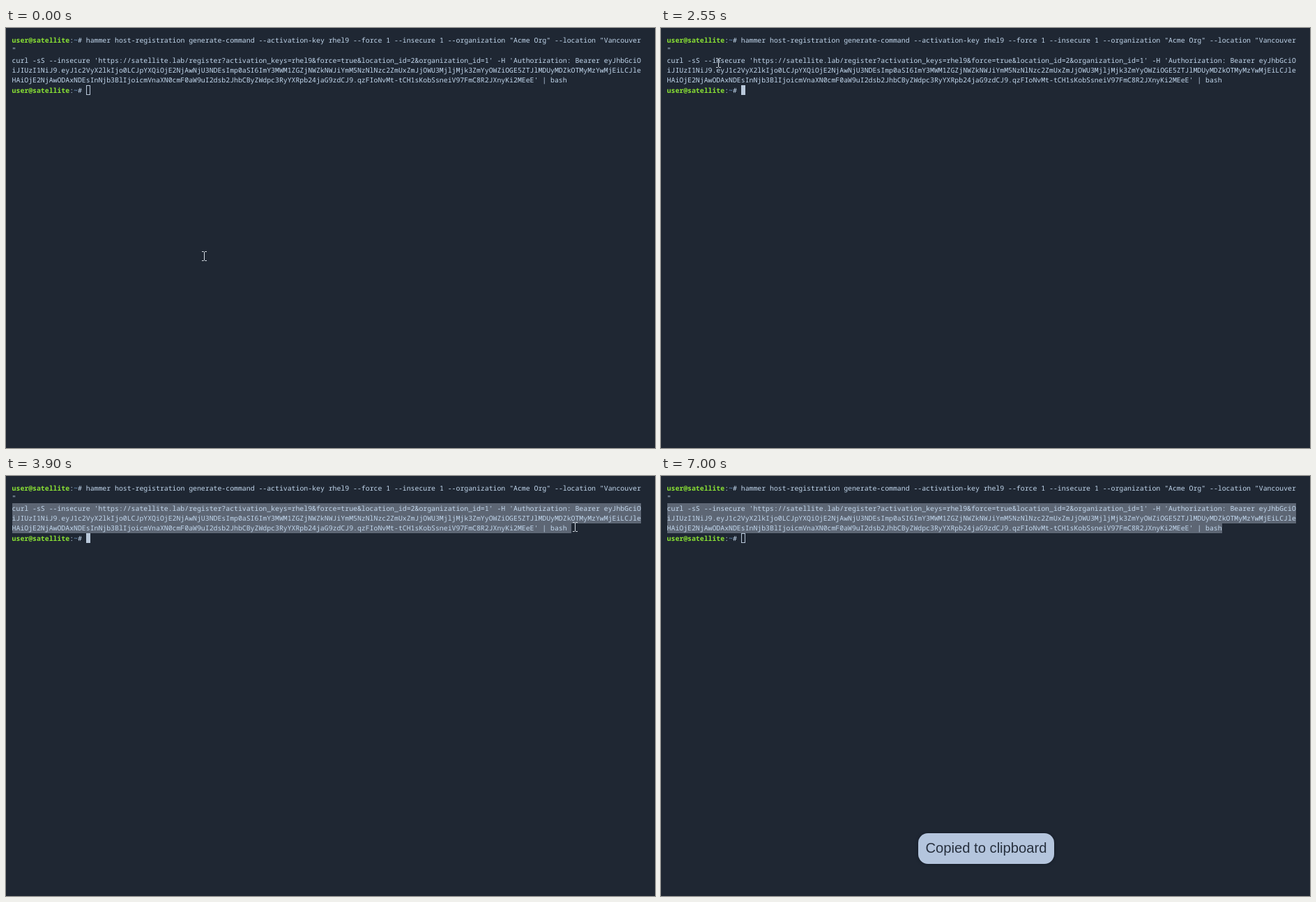
Animation of 931 by 602 pixels, one loop 7.05 s. Source, as an HTML page:

```html
<!DOCTYPE html>
<html lang="en">
<head>
<meta charset="utf-8">
<style>
html, body { margin: 0; width: 100%; height: 100%; overflow: hidden; background: #1f2733; }
body { position: relative; }
body > * { position: absolute; box-sizing: border-box; }
pre {
  margin: 0; left: 8.6px; top: 9.7px; color: #c3d8ee;
  font: 9.8333px/14.4px "Noto Sans Mono", monospace;
  text-rendering: geometricPrecision; font-variant-ligatures: none;
}
pre b { color: #8ae234; }
pre i { color: #729fcf; font-style: normal; }
.sel { left: 8.6px; height: 14.4px; background: #5d6674; }
#cursor { left: 115px; top: 82px; width: 6px; height: 14px; border: 1px solid #b9c8da; }
#toast {
  left: 369px; top: 512px; width: 195px; height: 43.5px; border-radius: 14px;
  background: #b4c5dd; color: #262f3d; box-shadow: 0 0 4px #121a26;
  font: 20.2px/43px "Liberation Sans", Arial, sans-serif; text-align: center; white-space: nowrap;
}
#mouse { left: -4px; top: -7px; }
</style>
</head>
<body>
<div class="sel"></div><div class="sel"></div><div class="sel"></div>
<pre><b>user@satellite</b>:<i>~</i># hammer host-registration generate-command --activation-key rhel9 --force 1 --insecure 1 --organization "Acme Org" --location "Vancouver
"
curl -sS --insecure 'https://satellite.lab/register?activation_keys=rhel9&amp;force=true&amp;location_id=2&amp;organization_id=1' -H 'Authorization: Bearer eyJhbGciO
iJIUzI1NiJ9.eyJ1c2VyX2lkIjo0LCJpYXQiOjE2NjAwNjU3NDEsImp0aSI6ImY3MWM1ZGZjNWZkNWJiYmM5NzNlNzc2ZmUxZmJjOWU3MjljMjk3ZmYyOWZiOGE5ZTJlMDUyMDZkOTMyMzYwMjEiLCJle
HAiOjE2NjAwODAxNDEsInNjb3BlIjoicmVnaXN0cmF0aW9uI2dsb2JhbCByZWdpc3RyYXRpb24jaG9zdCJ9.qzFIoNvMt-tCH1sKobSsneiV97FmC8R2JXnyKi2MEeE' | bash
<b>user@satellite</b>:<i>~</i># </pre>
<div id="cursor"></div>
<div id="toast">Copied to clipboard</div>
<svg id="mouse" width="8" height="14" fill="none" stroke="#d5dce4">
  <path d="M1 .5H3.5L4.5 1.5 5.5 .5H8M4.5 1V13M1 13.5H3.5L4.5 12.5 5.5 13.5H8"/>
</svg>
<script>
const LOOP = 7050, STEP = 50;
const CELL = 5.9, ROW = 14.4, LEFT = 8.6, TOP = 10.2;
const COLUMNS = 153, FIRST_ROW = 2;
const FOCUS = 1900, BLUR = 7000, COPY = 5050, HIDE_MOUSE = 5400;

// Pointer path: time, x, y
const path = [
  [250, 284, 327], [500, 130, 164], [700, 130, 164], [1400, 20, 49], [1650, 13, 46],
  [2500, 13, 46], [2700, 288, 63], [2750, 340, 66], [2900, 450, 69], [3050, 450, 69],
  [3200, 601, 71], [3250, 658, 72], [3350, 720, 73], [3500, 720, 73],
  [3850, 816, 73], [4250, 816, 73], [4300, 806, 73]
];

const [cursor, toast, mouse] = ['cursor', 'toast', 'mouse'].map(id => document.getElementById(id));
const bars = [...document.querySelectorAll('.sel')];
bars.forEach((bar, i) => bar.style.top = TOP + (FIRST_ROW + i) * ROW + 'px');

const show = (element, visible) => element.style.visibility = visible ? 'visible' : 'hidden';

function pointer(t) {
  const next = path.findIndex(point => point[0] > t);
  if (next < 0) return path.at(-1).slice(1);
  if (next === 0) return path[0].slice(1);
  const [t0, x0, y0] = path[next - 1], [t1, x1, y1] = path[next];
  const k = (t - t0) / (t1 - t0);
  return [x0 + (x1 - x0) * k, y0 + (y1 - y0) * k];
}

// The selection trails the pointer by one step
function drawSelection(t) {
  const [x, y] = pointer(t - STEP);
  const lastRow = Math.floor((y - TOP) / ROW) - FIRST_ROW;
  const column = Math.floor((x - LEFT) / CELL);
  bars.forEach((bar, row) => {
    const cells = t < FOCUS || row > lastRow ? 0 : row < lastRow ? COLUMNS : column;
    bar.style.width = cells * CELL + 'px';
  });
}

function draw(t) {
  const [x, y] = pointer(t);
  mouse.style.transform = `translate(${Math.round(x)}px, ${Math.round(y)}px)`;
  show(mouse, t < HIDE_MOUSE);
  drawSelection(t);
  const focused = t >= FOCUS && t < BLUR;
  cursor.style.background = focused ? '#b9c8da' : 'none';
  show(cursor, !focused || (t - FOCUS) % 1500 < 900);
  show(toast, t >= COPY);
}

const start = performance.now();
function frame() {
  const t = (performance.now() - start) % LOOP;
  draw(Math.floor(t / STEP) * STEP);
  requestAnimationFrame(frame);
}
frame();
</script>
</body>
</html>
```
